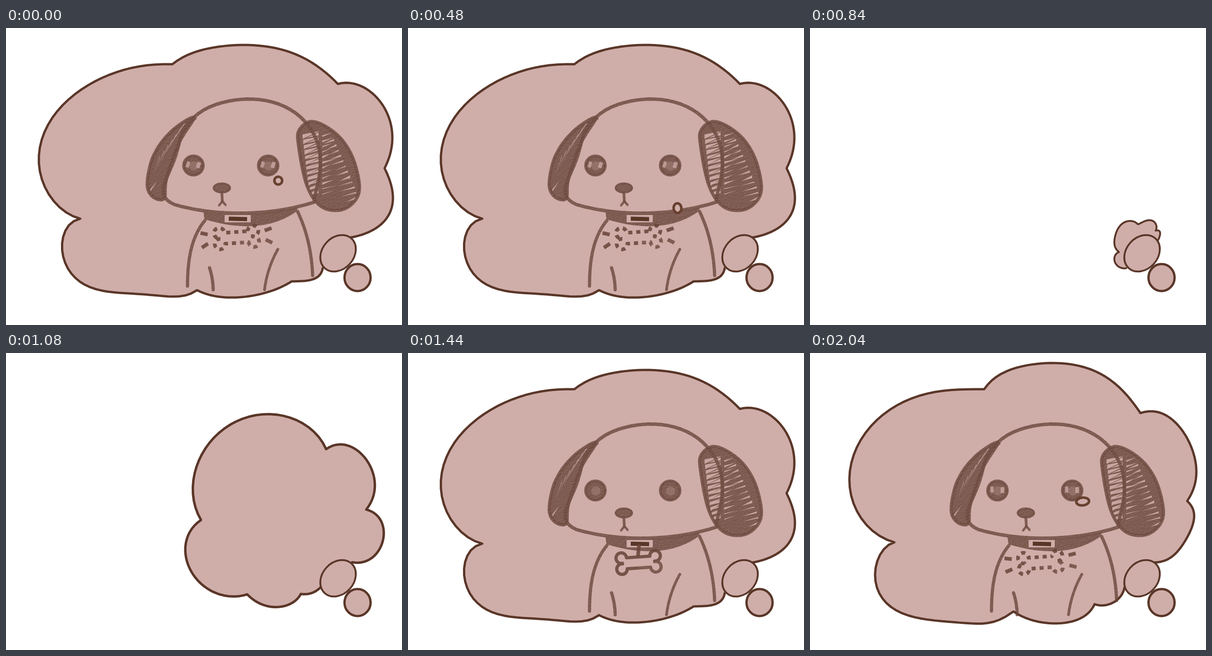
These frames come from a looping animation (864x648 px, 2.16 s). An HTML page with a canvas:

```html
<!DOCTYPE html>
<html lang="en">
<head>
<meta charset="utf-8">
<title>Sad puppy thought</title>
<style>
html, body { margin: 0; width: 100%; height: 100%; overflow: hidden; background: #fff; }
canvas { display: block; width: 864px; height: 648px; }
</style>
</head>
<body>
<canvas id="stage" width="864" height="648"></canvas>
<script>
const W = 864, H = 648, STEP = 120, STEPS = 18;
const PINK = '#cfaeaa', INK = '#5a3628', PENCIL = '#674338';
const ctx = document.getElementById('stage').getContext('2d');

// Clouds: lobes run clockwise from the bottom right, each through a few key points.
const cloudA = [
  [691,524, 680,543, 658,551, 623,553],
  [623,553, 575,575, 525,586, 470,587, 417,572],
  [417,572, 360,586, 250,578, 165,556, 124,495, 162,416],
  [162,416, 102,375, 73,266, 130,162, 245,95, 363,79],
  [363,79, 440,45, 520,37, 605,48, 665,74, 724,122],
  [724,122, 768,124, 823,170, 843,240, 826,306],
  [826,306, 842,350, 838,402, 800,441, 752,457]
];
const cloudB = [
  [686,512, 675,534, 650,549, 621,548],
  [621,548, 590,579, 537,590, 485,583, 444,564],
  [444,564, 350,590, 240,579, 160,538, 142,480, 184,413],
  [184,413, 110,358, 86,270, 140,152, 250,90, 380,79],
  [380,79, 420,44, 540,22, 625,41, 680,80, 721,131],
  [721,131, 775,135, 825,190, 843,258, 823,323],
  [823,323, 838,360, 822,404, 800,435, 752,457]
];
const cloudBig = [
  [685,510, 665,523, 636,526],
  [636,526, 615,548, 575,559, 535,551, 501,527],
  [501,527, 440,529, 375,488, 349,425, 387,345],
  [387,345, 368,265, 400,170, 480,104, 590,93, 696,176],
  [696,176, 750,169, 799,215, 812,275, 791,326],
  [791,326, 830,362, 826,418, 755,455]
];
const tucked = n => Array(n).fill([690, 524]).flat();
const cloudSmall = [
  tucked(3),
  tucked(5),
  [690,524, 678,523, 665,510, 665,498, 674,489],
  [674,489, 664,468, 669,444, 684,425, 700,421, 715,428],
  [715,428, 735,420, 751,423, 756,433, 754,442],
  [754,442, 763,444, 763,454, 757,467]
];

let seed = 7;
function rnd() {
  seed = (seed * 16807) % 2147483647;
  return seed / 2147483647;
}

// One polynomial through all points, spaced by distance.
function sweep(c, p, join) {
  const n = p.length / 2, knot = [0];
  for (let i = 1; i < n; i++)
    knot[i] = knot[i - 1] + 0.01 + Math.hypot(p[2 * i] - p[2 * i - 2], p[2 * i + 1] - p[2 * i - 1]);
  if (!join) c.moveTo(p[0], p[1]);
  for (let s = 1; s <= 32; s++) {
    const t = knot[n - 1] * s / 32;
    let x = 0, y = 0;
    for (let i = 0; i < n; i++) {
      let w = 1;
      for (let j = 0; j < n; j++) if (j !== i) w *= (t - knot[j]) / (knot[i] - knot[j]);
      x += w * p[2 * i];
      y += w * p[2 * i + 1];
    }
    c.lineTo(x, y);
  }
}

// Closed smooth outline.
function ring(c, p) {
  const n = p.length / 2;
  const at = (i, k) => p[2 * ((i + n) % n) + k];
  const out = (i, s, k) => at(i, k) + s * (at(i + 1, k) - at(i - 1, k)) / 6;
  c.beginPath();
  c.moveTo(p[0], p[1]);
  for (let i = 0; i < n; i++)
    c.bezierCurveTo(out(i, 1, 0), out(i, 1, 1), out(i + 1, -1, 0), out(i + 1, -1, 1), at(i + 1, 0), at(i + 1, 1));
  c.closePath();
}

function line(c, width, ...p) {
  c.beginPath();
  sweep(c, p);
  c.lineWidth = width;
  c.stroke();
}

function oval(c, x, y, rx, ry, width, turn = 0) {
  c.beginPath();
  c.ellipse(x, y, rx, ry, turn, 0, Math.PI * 2);
  c.fill();
  if (width) { c.lineWidth = width; c.stroke(); }
}

function chip(c, x, y, w, h, turn = 0) {
  c.save();
  c.translate(x, y);
  c.rotate(turn);
  c.fillRect(-w / 2, -h / 2, w, h);
  c.restore();
}

function wedge(c, x1, y1, x2, y2, w) {
  c.beginPath();
  c.moveTo(x1, y1 - w / 2);
  c.lineTo(x2, y2);
  c.lineTo(x1, y1 + w / 2);
  c.fill();
}

function layer() {
  const c = document.createElement('canvas');
  c.width = W;
  c.height = H;
  const g = c.getContext('2d');
  g.lineCap = g.lineJoin = 'round';
  g.fillStyle = g.strokeStyle = PENCIL;
  return g;
}

// Embossed paper grain that thins the pencil.
const grain = (() => {
  const g = layer(), img = g.createImageData(W, H), v = Array.from({ length: W * H }, rnd);
  const soft = i => (v[i] + v[i + 1] + v[i + 2] + v[i + 3 - W] + v[i + W]) / 5 || 0;
  for (let i = 0; i < v.length; i++) {
    const a = 0.1 + (soft(i) - soft(i + 2 * W + 1)) * 0.35;
    img.data[4 * i + 3] = 255 * Math.max(0, Math.min(0.4, a));
  }
  g.putImageData(img, 0, 0);
  return g.canvas;
})();

// Strokes are see-through, so overlaps get darker.
function sketch(draw) {
  const g = layer();
  g.globalAlpha = 0.85;
  draw(g);
  g.globalAlpha = 1;
  g.globalCompositeOperation = 'destination-out';
  g.drawImage(grain, 0, 0);
  return g.canvas;
}

function erase(g, alpha, draw) {
  g.save();
  g.globalCompositeOperation = 'destination-out';
  g.globalAlpha = alpha;
  draw();
  g.restore();
}

function ear(g, points, gaps) {
  ring(g, points);
  g.fill();
  erase(g, 0.9, gaps);
  ring(g, points);
  g.lineWidth = 7;
  g.stroke();
}

const dog = sketch(g => {
  ear(g, [410,195, 360,226, 322,278, 308,340, 320,368, 345,372, 350,330, 378,250], () => {
    for (let i = 0; i < 7; i++) wedge(g, 390 - i * 9, 208 + i * 12, 370 - i * 8, 236 + i * 14, 3);
    wedge(g, 315, 354, 330, 334, 5);
  });
  ear(g, [640,222, 666,204, 703,218, 738,250, 762,298, 770,360, 738,395, 690,391, 657,345, 638,255], () => {
    for (let i = 0; i < 12; i++) {
      const y = 232 + i * 11.5;
      wedge(g, 647 + i * 1.4, y + 5, 684, y - 7, 6 + rnd() * 4);
      wedge(g, 682, y - 1, 655, y + 8, 3 + rnd() * 4);
      wedge(g, 690, y + 4, 708 + rnd() * 16, y - 4, 2 + rnd() * 4);
      wedge(g, Math.min(716 + i * 5, 764), y + 12, 690 + i * 4 + rnd() * 12, y + 21, 2 + rnd() * 4);
    }
  });
  g.beginPath();
  sweep(g, [408,197, 455,168, 530,155, 615,175, 666,222, 686,300, 672,380]);
  sweep(g, [672,380, 600,397, 500,404, 420,397, 367,385], true);
  sweep(g, [367,385, 343,355, 360,305, 378,250, 412,197], true);
  g.lineWidth = 7.5;
  g.stroke();

  g.beginPath();
  sweep(g, [431,402, 500,407, 570,403, 637,392]);
  sweep(g, [637,398, 570,428, 510,432, 433,417], true);
  g.fill();
  erase(g, 1, () => g.fillRect(477, 408, 57, 16));

  for (const x of [409, 572]) {
    oval(g, x, 300, 21.5, 21, 6);
    erase(g, 0.25, () => oval(g, x + 1, 301, 10, 10));
  }
  oval(g, 471, 349, 18, 10, 4);
  line(g, 6, 471,360, 472,378);
  line(g, 5, 465,387, 472,378);
  line(g, 5, 479,386, 472,378);
  line(g, 7, 434,420, 413,455, 400,503, 396,563);
  line(g, 7, 636,400, 652,440, 664,490, 669,540);
  line(g, 7, 444,523, 450,548, 452,571);
  line(g, 6, 593,483, 578,515, 564,571);
});

function bonePath(g) {
  const q = Math.PI / 2, r = 11.5, x = 37, y = 12;
  g.translate(503, 457);
  g.rotate(-0.07);
  g.beginPath();
  g.arc(x, -y, r, 2 * q, 5.1 * q);
  g.arc(x, y, r, -1.1 * q, 2 * q);
  g.arc(-x, y, r, 0, 3.1 * q);
  g.arc(-x, -y, r, 0.9 * q, 4 * q);
  g.closePath();
}

const bone = sketch(g => {
  line(g, 8, 504,420, 502,440);
  bonePath(g);
  g.lineWidth = 7;
  g.stroke();
});

// The vanished bone: its outline in dashes, with short rays at both ends.
const crumbs = [0, 1].map(odd => sketch(g => {
  bonePath(g);
  g.lineCap = 'butt';
  g.lineWidth = 8;
  g.setLineDash([9, 8.5]);
  g.lineDashOffset = odd * 8;
  g.stroke();
  for (const sx of [-1, 1])
    for (const sy of [-1, 1]) chip(g, sx * 70, sy * 13, 16, 8, sx * (sy + 0.3) * (odd ? 0.25 : 0.4));
}));

function cloud(lobes, width) {
  ctx.beginPath();
  lobes.forEach((p, i) => sweep(ctx, p, i > 0));
  ctx.fillStyle = PINK;
  ctx.strokeStyle = INK;
  ctx.lineWidth = width;
  ctx.fill();
  ctx.stroke();
}

function bubbles() {
  ctx.fillStyle = PINK;
  ctx.strokeStyle = INK;
  oval(ctx, 724.5, 491.5, 43.5, 34.5, 4, -0.84);
  oval(ctx, 767, 544.5, 28.5, 29.5, 5);
}

const mix = (a, b, k) => a.map((p, i) => p.map((v, j) => v + (b[i][j] - v) * k));

function shine(turn) {
  ctx.fillStyle = PINK;
  ctx.globalAlpha = 0.75;
  for (const x of [409, 572]) {
    chip(ctx, x - 12, 298, 7, 13, turn);
    chip(ctx, x + 11, 299, 8, 13, turn);
  }
  ctx.globalAlpha = 1;
}

function tear(step) {
  const fall = step === 17 ? -0.6 : step;
  ctx.fillStyle = PINK;
  ctx.strokeStyle = '#67402f';
  oval(ctx, 594 - 1.5 * fall, 333 + 15 * fall, fall < 0 ? 14 : 8.5, 8.5 + step % 17 * 0.5, 5.5, -0.1);
}

function puppy(step) {
  const odd = step % 2;
  cloud(odd ? cloudB : cloudA, 5);
  ctx.drawImage(dog, 0, 0);
  ctx.fillStyle = INK;
  chip(ctx, 506, 416.5, 40, 9, 0.02);
  ctx.drawImage(step > 10 && step < 14 ? bone : crumbs[odd], 0, 0);
  if (step > 15 || step < 5) shine(odd ? 0 : 0.3);
  if (step > 16 || step < 5) tear(step);
  bubbles();
}

function draw(step) {
  ctx.fillStyle = '#fff';
  ctx.fillRect(0, 0, W, H);
  ctx.lineCap = ctx.lineJoin = 'round';
  if (step === 5) return;
  if (step < 5 || step > 10) return puppy(step);
  if (step > 6) {
    const k = Math.sin((step - 7) / 3 * Math.PI / 2);
    cloud(mix(cloudSmall, cloudBig, k), 4 + k * 1.5);
  }
  bubbles();
}

const start = performance.now();
let last = -1;
function tick() {
  const step = Math.floor((performance.now() - start) / STEP) % STEPS;
  if (step !== last) draw(last = step);
  requestAnimationFrame(tick);
}
tick();
</script>
</body>
</html>
```
